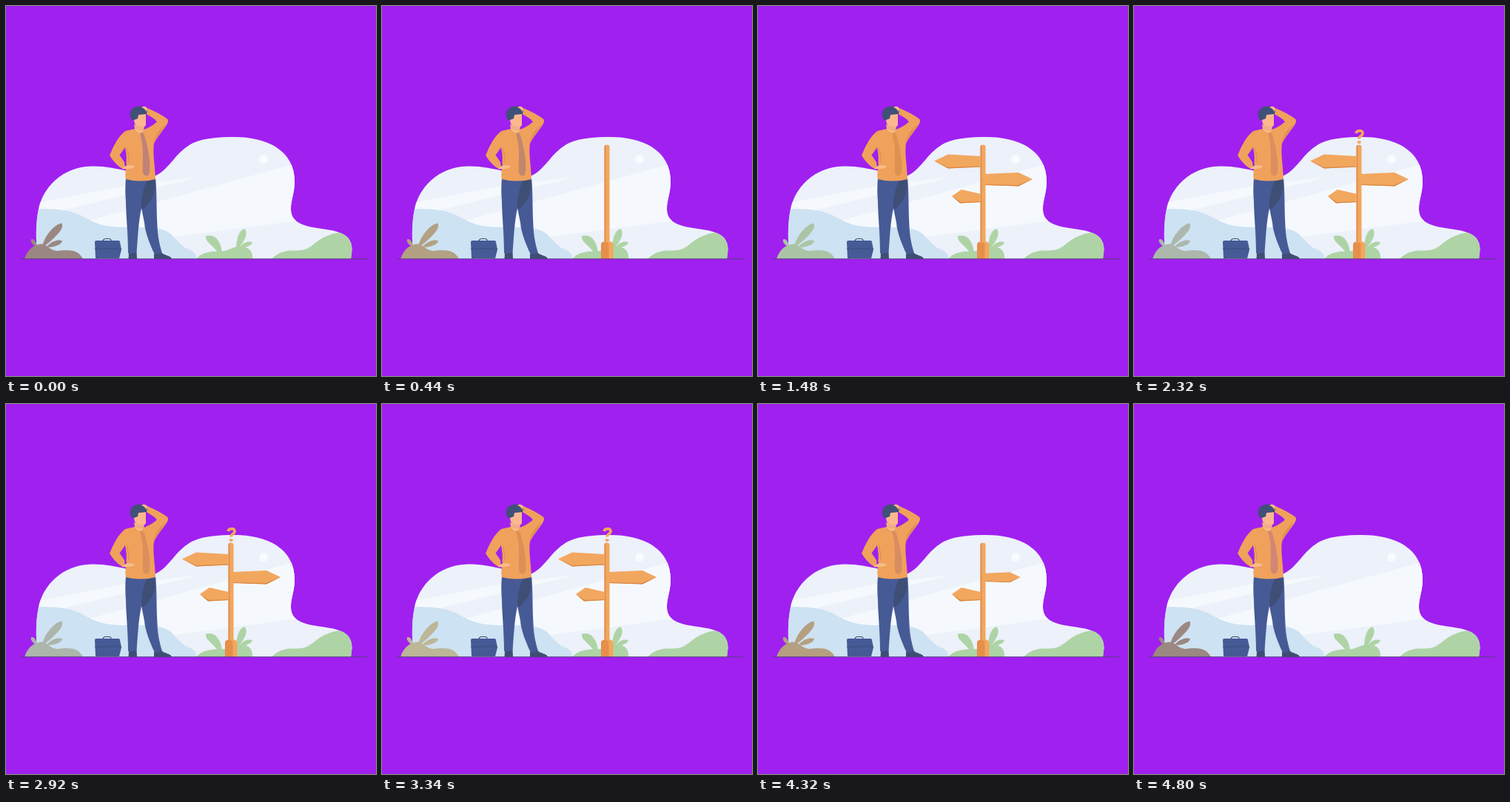
These frames come from a looping animation (500x500 px, 4.84 s). An HTML page:

```html
<!DOCTYPE html>
<html lang="en">
<head>
<meta charset="utf-8">
<title>Crossroads</title>
<style>
html, body { margin: 0; width: 100%; height: 100%; overflow: hidden; background: #a020f0; }
svg { display: block; width: 100vw; height: 100vh; }
</style>
</head>
<body>
<svg viewBox="0 0 500 500">
  <defs>
    <clipPath id="sky">
      <path d="M43 342C40 318 40 293 44 275C49 247 75 217 116 216.500C151 216 174 229 203 229C223 218 229 197 253 185C268 178 290 177 308 177C353 177 390 195 390 237C390 253 385 262 385 274C385 289 395 295 414 299C439 304 468 302 467.500 330L466 342Z"/>
    </clipPath>
  </defs>
  <rect width="500" height="500" fill="#a020f0"/>

  <g clip-path="url(#sky)">
    <rect x="20" y="160" width="470" height="190" fill="#ecf1fa"/>
    <path d="M38 267L162 243L262 231L70 278L38 276Z" fill="#f5f9fd"/>
    <path d="M105 292L395 212V290L205 315Z" fill="#f5f9fd"/>
    <circle cx="348" cy="207" r="6" fill="#f8fbff"/>
    <path d="M30 275C65 273 85 275 103 284C122 295 134 299 165 299C190 299 211 297 224 309C236 323 242 328 250 330Q256 333 258 342H30Z" fill="#cde2f2"/>
    <path d="M359 342C366 334 375 331 385 330.500C403 331 407 329 417 321C429 311 442 307 452 306L475 306V342Z" fill="#aed4a5"/>
  </g>

  <g id="scrub">
    <path d="M25 342C28 332 35 323 47 321.500C56 322 59 330 69 331C85 329 98 329 104 342Z"/>
    <path d="M49 324C53 309 66 295 75 293.500C79 299 72 308 54 323Z"/>
    <path d="M55 325C62 317 72 315 76 317.500C75 322 68 325 59 326Z"/>
    <path d="M40 325C34 321 32 316 35 315C39 315 40 319 42 323Z"/>
  </g>

  <g fill="#aed4a5">
    <path d="M257 342C264 334 272 332 284 331.500C300 333 305 325 316 325C327 325 334 330 333 342Z"/>
    <path d="M286 333C280 323 269 319 270 311C280 307 290 315 292 333Z"/>
    <path d="M311 328C311 315 315 303 322 301C328 306 323 316 315 327Z"/>
    <path d="M316 327C320 319 328 317 333 319.500C332 324 325 325 319 328Z"/>
  </g>

  <g id="sign">
    <g id="post">
      <path d="M300.500 342V190Q300.500 187.500 304 187.500T307.500 190V342Z" fill="#f2a75f"/>
      <path d="M300.500 342V190Q300.500 188 302.500 187.700V342Z" fill="#e3904f"/>
    </g>
    <g id="base">
      <path d="M296 342V323Q296 318.500 301 318.500H307Q312.500 318.500 312.500 323V342Z" fill="#f2a75f"/>
      <path d="M296 342V323Q296 319 301 319Q306.500 319 306.500 323V342Z" fill="#e68f4a"/>
    </g>
    <g id="low">
      <path d="M301 254L275 248L262 257L273 266.500L301 265Z" fill="#f2a75f"/>
      <path d="M262 257L273 266.500L301 265V264L274 265Z" fill="#d98745"/>
    </g>
    <g id="right">
      <path d="M307 227L352 225L371 234L352 243.500L307 242Z" fill="#f2a75f"/>
      <path d="M371 234L352 243.500L307 242V241L351 242Z" fill="#d98745"/>
    </g>
    <g id="high">
      <path d="M301 203L257 200.500L238 209.500L257 219.500L301 217.500Z" fill="#f2a75f"/>
      <path d="M238 209.500L257 219.500L301 217.500V216.500L257 218Z" fill="#d98745"/>
    </g>
    <g id="ask">
      <path d="M300 172C301 168 309 167 309 172C309 176 304 175 304 179.500" fill="none" stroke="#f2a75f" stroke-width="3.800"/>
      <ellipse cx="304.200" cy="184" rx="2.600" ry="2.100" fill="#f2a75f"/>
    </g>
  </g>

  <g id="bag">
    <path d="M131 318V317Q132 314.500 135 314.500H139Q142 314.500 142.500 318" fill="none" stroke="#3a4a78" stroke-width="1.200"/>
    <path d="M122 317H152Q154 317 154 319L156 329L153 341H121L120 319Q120 317 122 317Z" fill="#465a96"/>
    <path d="M120 328H156" stroke="#3a4a78" stroke-width=".9"/>
  </g>

  <g id="man">
    <path d="M166 333H176.500L177 342H165.500ZM200 335L210 333C213 337 223 337 224 342H200Z" fill="#3e4e74"/>
    <path d="M162 232L202 233C204 250 203 270 204.500 297C205 313 208 324 211 334L201 336C194 321 188 306 187 293L183 273C179 292 178 313 176.500 334H165C165 308 162 281 162 265C161 254 161 243 162 232Z" fill="#465a96"/>
    <path d="M190 237L201.500 235C203 251 198 265 183.500 275C182 263 185 248 190 237Z" fill="#3e4e74"/>
    <path d="M173 160L187 163L185 172L175 172Z" fill="#f3ad85"/>
    <path d="M161 169L174 166Q181 174 186 167C192 165 199 161 204 156.500C199 150 191 148 188 144L191 138C203 143 212 148 218.500 153Q220 156 218 159C212 169 204 177 200 186C198 198 201 212 202 234Q182 239 162 234C160 226 163 220 163 214L154 201L162 192L160 213Q162 219 158 220.500C149 215 144 208 140 202C145 189 152 176 161 169Z" fill="#f0a15b"/>
    <path d="M161 191L153.500 201.500L162 214C164 207 162 198 161 191Z" fill="#a020f0"/>
    <path d="M163 190C166 199 168 207 164 215C167 205 163 199 163 190ZM199 186C202 178 211 171 215 160C207 167 201 175 199 186Z" fill="#df9054"/>
    <path d="M157 220C161 214 170 214 174 217C172 220 163 221 157 220Z" fill="#f8bd89"/>
    <path id="tie" d="M181 171L184 170L187 175C191 187 194 203 194.500 216C194 222 195 225 192 229Q188 231 185 226C184 211 187 193 182 176Z"/>
    <path d="M174 166Q178 173 184 171L186 167L182 169Z" fill="#f8bd89"/>
    <path d="M173 149L178 145H189V161Q188 164 182 163Q174 163 173 155Z" fill="#f9b88f"/>
    <path d="M170 154C166 148 167 139 174 137C181 134 188 136 191 141L190 146L179 147L178 152L173 154Z" fill="#405078"/>
    <path d="M183 137Q187 134 191 138L190 143Q187 138 183 137Z" fill="#f8bd89"/>
  </g>

  <path d="M20 341.700H488" stroke="#56417f" stroke-width="1.100"/>
</svg>
<script>
const LOOP = 4840;
const $ = id => document.getElementById(id);
const clamp = x => Math.max(0, Math.min(1, x));
const ease = x => (1 - Math.cos(Math.PI * clamp(x))) / 2;

// id, pivot x, pivot y, entry time, exit time
const pops = [
  ['base', 304, 342, 40, 4520],
  ['low', 301, 260, 420, 4340],
  ['right', 307, 234, 660, 4260],
  ['high', 301, 209, 960, 4160],
  ['ask', 304, 187, 1540, 4040]
];

const tints = [
  [0, [155, 136, 130], [190, 130, 120]],
  [900, [201, 188, 132], [201, 140, 96]],
  [1480, [171, 196, 165], [222, 146, 82]],
  [2320, [171, 184, 171], [219, 143, 95]],
  [2920, [172, 182, 170], [219, 143, 92]],
  [3840, [206, 184, 128], [222, 146, 78]],
  [4800, [155, 136, 130], [211, 134, 118]],
  [LOOP, [155, 136, 130], [190, 130, 120]]
];

function pop(t, start, end) {
  const grow = t < start + 240
    ? 1.2 * ease((t - start) / 240)
    : 1.2 - 0.2 * ease((t - start - 240) / 180);
  return grow * (1 - ease((t - end) / 180));
}

function place(id, x, y, sx, sy) {
  const el = $(id);
  el.style.display = sx * sy > 0.001 ? '' : 'none';
  el.setAttribute('transform', `translate(${x} ${y}) scale(${sx} ${sy}) translate(${-x} ${-y})`);
}

function tint(t, slot) {
  const i = tints.findIndex(k => k[0] > t);
  const a = tints[i - 1], b = tints[i];
  const p = (t - a[0]) / (b[0] - a[0]);
  return `rgb(${a[slot].map((v, n) => Math.round(v + (b[slot][n] - v) * p))})`;
}

function draw(t) {
  place('post', 304, 342, 1, ease((t - 100) / 340) * (1 - ease((t - 4420) / 240)));
  for (const [id, x, y, start, end] of pops) {
    const s = pop(t, start, end);
    place(id, x, y, s, s);
  }
  $('scrub').setAttribute('fill', tint(t, 1));
  $('tie').setAttribute('fill', tint(t, 2));
}

const begin = performance.now();
function tick() {
  draw((performance.now() - begin) % LOOP);
  requestAnimationFrame(tick);
}
tick();
</script>
</body>
</html>
```
